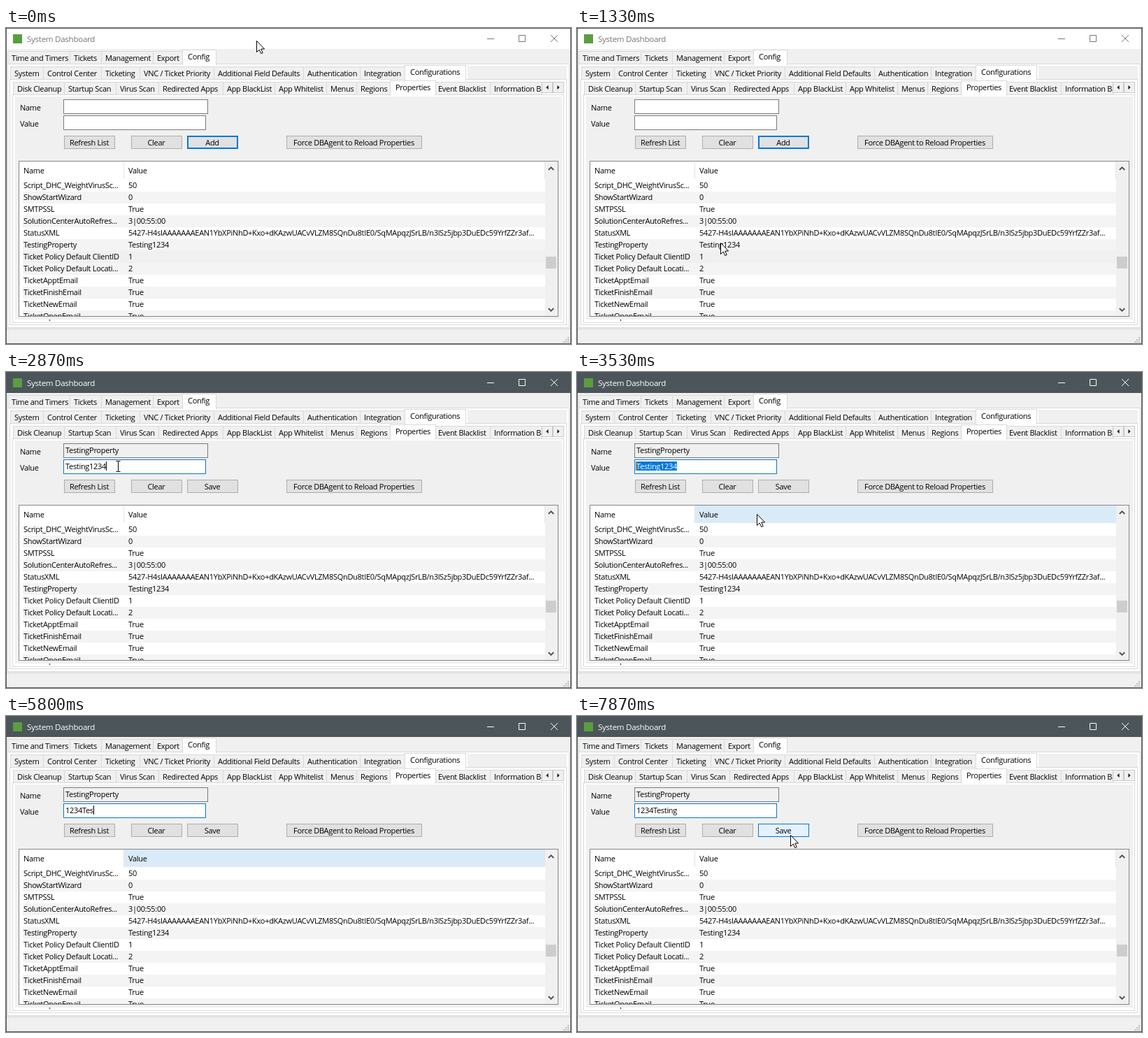
These frames come from a looping animation (808x452 px, 8 s). An HTML page:

```html
<!DOCTYPE html>
<html lang="en">
<head>
<meta charset="utf-8">
<title>System Dashboard</title>
<style>
  html, body { margin: 0; width: 100%; height: 100%; overflow: hidden; background: #f0f0f0; }
  svg { display: block; width: 808px; height: 452px; }
  rect { shape-rendering: crispEdges; }
  text { font: 11px 'Open Sans', 'Noto Sans', sans-serif; letter-spacing: -.3px; fill: #000; white-space: pre; }
  .title { font-size: 11.6px; }
  .mid { text-anchor: middle; }
</style>
</head>
<body>
<svg id="stage" viewBox="0 0 808 452"></svg>
<script>
const LOOP = 8000, STEP = 200 / 3;
const BLUE = '#0078d7', FACE = '#f0f0f0', LINE = '#d9d9d9';
const stage = document.getElementById('stage');

function add(tag, attrs, content) {
  const node = document.createElementNS('http://www.w3.org/2000/svg', tag);
  set(node, attrs);
  if (content !== undefined) node.textContent = content;
  return stage.appendChild(node);
}
function set(node, attrs) {
  for (const key in attrs) node.setAttribute(key, attrs[key]);
}
const fill = (x, y, width, height, color) => add('rect', { x, y, width, height, fill: color });
const box = (x, y, w, h, color, stroke) =>
  add('rect', { x: x + .5, y: y + .5, width: w - 1, height: h - 1, fill: color, stroke });
const label = (x, y, content, cls = '') => add('text', { x, y, class: cls }, content);
const path = (d, stroke, color = 'none') => add('path', { d, stroke, fill: color });
const show = (node, on) => node.setAttribute('visibility', on ? 'visible' : 'hidden');

// Window frame
fill(0, 0, 808, 452, FACE);
const titleBar = fill(1, 1, 806, 29, '#fff');
fill(10, 9, 13, 13, '#5a9e3f');
const title = label(30, 20, 'System Dashboard', 'title');
const captionIcons = path('M688 15.5h10M733.5 10.5h9v9h-9zM779 10l10 10M789 10l-10 10', '#777');

// Nested tab controls
function tabs(top, items, selected, end) {
  const edge = i => i < items.length ? items[i][1] - 6 : end;
  items.forEach(([name, x], i) => {
    if (i !== selected) box(edge(i), top, edge(i + 1) - edge(i) + 1, 19, FACE, LINE);
  });
  const left = edge(selected) - 2, width = edge(selected + 1) - left + 3;
  box(left, top - 2, width, 22, '#fff', LINE);
  fill(left + 1, top + 18, width - 2, 3, '#fff');
  items.forEach(([name, x], i) => label(x, top + (i === selected ? 12 : 14), name));
}
box(2, 51, 804, 378, '#fff', LINE);
fill(660, 54, 142, 19, FACE);
tabs(33, [['Time and Timers', 8], ['Tickets', 97], ['Management', 142], ['Export', 216], ['Config', 260]], 4, 298);
box(5, 73, 797, 352, '#fff', LINE);
tabs(55, [['System', 12], ['Control Center', 59], ['Ticketing', 142], ['VNC / Ticket Priority', 197],
  ['Additional Field Defaults', 303], ['Authentication', 431], ['Integration', 512], ['Configurations', 578]], 7, 655);
box(9, 95, 789, 327, '#fff', LINE);
fill(13, 98, 782, 319, FACE);
tabs(77, [['Disk Cleanup', 16], ['Startup Scan', 89], ['Virus Scan', 163], ['Redirected Apps', 224],
  ['App BlackList', 316], ['App Whitelist', 390], ['Menus', 464], ['Regions', 507], ['Properties', 557],
  ['Event Blacklist', 618], ['Information Ba', 698]], 8, 766);
box(766, 77, 16, 16, FACE, '#c8c8c8');
box(782, 77, 16, 16, FACE, '#c8c8c8');
path('M775.5 82v6l-3-3zM788.5 82v6l3-3z', 'none', '#000');

// Form
label(20, 118, 'Name');
label(20, 141, 'Value');
const nameField = box(82, 102, 207, 21, '#fff', '#7a7a7a');
const valueField = box(82, 125, 204, 21, '#fff', '#7a7a7a');
const nameText = label(85, 116, '');
const selection = fill(84, 128, 61, 13, BLUE);
const valueText = label(85, 139, '');
const caret = fill(85, 128, 1, 13, '#000');

function button(x, w, name) {
  const face = box(x, 154, w, 19, '#e1e1e1', '#adadad');
  const ring = add('rect', { x: x + 1, y: 155, width: w - 2, height: 17, fill: 'none',
    stroke: BLUE, 'stroke-width': 2, visibility: 'hidden' });
  return { x, w, face, ring, text: label(x + w / 2 - .5, 168, name, 'mid') };
}
const buttons = [button(83, 73, 'Refresh List'), button(179, 73, 'Clear'),
  button(259, 73, 'Add'), button(401, 194, 'Force DBAgent to Reload Properties')];
const saveButton = buttons[2];

// Property list
const ROWS = [
  ['Script_DHC_WeightVirusSc...', '50'],
  ['ShowStartWizard', '0'],
  ['SMTPSSL', 'True'],
  ['SolutionCenterAutoRefres...', '3|00:55:00'],
  ['StatusXML', '5427-H4sIAAAAAAAEAN1YbXPiNhD+Kxo+dKAzwUACvVLZM8SQnDu8tIE0/SqMApqzJSrLB/n3lSz5jbp3DuEDc59YrfZZr3af...'],
  ['TestingProperty', 'Testing1234'],
  ['Ticket Policy Default ClientID', '1'],
  ['Ticket Policy Default Locati...', '2'],
  ['TicketApptEmail', 'True'],
  ['TicketFinishEmail', 'True'],
  ['TicketNewEmail', 'True'],
  ['TicketOpenEmail', 'True']
];
const PICKED = 5, PICKED_BEFORE = 6;
fill(18, 190, 772, 223, '#fff');
const header = fill(169, 191, 602, 25, '#d9ebf9');
fill(168, 191, 1, 25, '#e5e5e5');
fill(770, 191, 1, 25, '#e5e5e5');
label(25, 208, 'Name');
label(175, 208, 'Value');
const rows = ROWS.map(([name, value], i) => {
  const y = 217 + 17 * i;
  return {
    back: fill(24, y, 747, Math.min(17, 412 - y), i % 2 ? '#f4f4f4' : '#fff'),
    texts: [label(25, y + 12, name), label(175, y + 12, value)]
  };
});
fill(771, 191, 18, 221, FACE);
fill(772, 327, 15, 17, '#cdcdcd');
set(path('M775.8 203l3.7-3.7l3.7 3.7M775.8 401l3.7 3.7l3.7-3.7', '#505050'), { 'stroke-width': 1.8 });
fill(19, 412, 770, 5, FACE);
box(18, 190, 772, 223, 'none', '#828790');

// Status bar and window edge
fill(1, 430, 806, 1, '#d7d7d7');
for (let r = 0; r < 3; r++)
  for (let c = 2 - r; c < 3; c++) fill(797 + c * 3, 442 + r * 3, 2, 2, '#bfbfbf');
const edge = box(0, 0, 808, 452, 'none', '#555');

// Pointers
const arrow = path('M.5 .5V16.5L4.2 13L6.7 18.5L9.2 17.5L6.8 12H11.6Z', '#000', '#fff');
const beam = path('M-3 -7.5h2.5l.5 .5l.5 -.5h2.5M0 -7v14M-3 7.5h2.5l.5 -.5l.5 .5h2.5', '#000');

const POINTER = [
  [133, 358, 18], [333, 345, 48], [600, 290, 150], [800, 247, 228], [1000, 219, 283], [1333, 205, 307],
  [1900, 205, 307], [2200, 187, 199], [2533, 192, 154], [2600, 180, 135], [2733, 160, 135],
  [2867, 160, 135], [3133, 76, 135], [3267, 110, 160], [3467, 252, 200], [3533, 257, 203],
  [6933, 318, 197], [7000, 320, 197], [7200, 330, 193], [7533, 309, 172], [7667, 305, 170]
];
const TYPED = [[4670, 1], [4730, 2], [4870, 3], [5070, 4], [5470, 5], [5530, 6],
  [5800, 7], [5930, 8], [6070, 9], [6200, 10], [6270, 11]];
const CLICK = 1730, LOADED = 1870, PRESS = 2870, RELEASE = 3140, TYPE = 4670, MOVE_AGAIN = 7000;
const REST = 3530, BLINK = 530;

function pointerAt(t) {
  const i = POINTER.findIndex(p => p[0] > t);
  if (i === 0) return POINTER[0].slice(1);
  if (i < 0) return POINTER[POINTER.length - 1].slice(1);
  const [t0, x0, y0] = POINTER[i - 1], [t1, x1, y1] = POINTER[i];
  if (t0 > REST && t < MOVE_AGAIN - STEP || t0 >= REST && t < TYPE) return [x0, y0];
  const k = (t - t0) / (t1 - t0);
  return [Math.round(x0 + (x1 - x0) * k), Math.round(y0 + (y1 - y0) * k)];
}

function draw(ms) {
  const time = Math.floor((ms + 5) / STEP) * STEP, t = time + 5;
  const active = t >= CLICK, loaded = t >= LOADED, focused = t >= PRESS;
  const dragging = focused && t < RELEASE, typing = t >= TYPE;
  const [px, py] = pointerAt(time);
  const over = (x, y, w, h) => px >= x && px < x + w && py >= y && py < y + h;

  set(titleBar, { fill: active ? '#4b555a' : '#fff' });
  set(edge, { stroke: active ? '#4b555a' : '#555' });
  title.style.fill = active ? '#fff' : '#777';
  set(captionIcons, { stroke: active ? '#fff' : '#777' });

  const picked = active && !focused;
  set(rows[PICKED].back, { fill: picked ? BLUE : '#f4f4f4' });
  rows[PICKED].texts.forEach(node => { node.style.fill = picked ? '#fff' : '#000'; });
  set(rows[PICKED_BEFORE].back, { fill: active ? '#fff' : FACE });

  set(nameField, { fill: loaded ? FACE : '#fff' });
  nameText.textContent = loaded ? 'TestingProperty' : '';
  const overValue = over(82, 125, 204, 21);
  set(valueField, { stroke: focused ? BLUE : overValue ? '#171717' : '#7a7a7a' });

  const lastKey = TYPED.filter(k => k[0] <= t).pop();
  valueText.textContent = lastKey ? '1234Testing'.slice(0, lastKey[1]) : loaded ? 'Testing1234' : '';
  const length = valueText.getComputedTextLength();
  const from = dragging ? Math.max(84, Math.min(px, 85 + length)) : 84;
  const selected = focused && !typing && from < 85 + length;
  show(selection, selected);
  set(selection, { x: from, width: 85 + length - from });
  valueText.style.fill = selected && from < 100 ? '#fff' : '#000';

  const caretOn = Math.floor((t - (lastKey ? lastKey[0] : 3470)) / BLINK) % 2 === 0;
  show(caret, focused && (dragging || caretOn));
  set(caret, { x: Math.round(typing ? 85 + length : Math.max(85, from)),
    fill: selected ? '#ff8728' : '#000' });

  const pointerShown = !typing || t >= MOVE_AGAIN;
  const ibeam = dragging || overValue;
  saveButton.text.textContent = loaded ? 'Save' : 'Add';
  for (const b of buttons) {
    const hover = !dragging && pointerShown && over(b.x, 154, b.w, 19);
    set(b.face, { fill: hover ? '#e5f1fb' : '#e1e1e1', stroke: hover ? BLUE : '#adadad' });
    show(b.ring, b === saveButton && !loaded);
  }
  // The header stays lit while the pointer is hidden over it
  show(header, typing && !pointerShown || over(169, 191, 602, 25));

  show(arrow, pointerShown && !ibeam);
  show(beam, pointerShown && ibeam);
  set(arrow, { transform: `translate(${px} ${py})` });
  set(beam, { transform: `translate(${px + .5} ${py})` });
}

const start = performance.now();
function tick() {
  draw((performance.now() - start) % LOOP);
  requestAnimationFrame(tick);
}
tick();
</script>
</body>
</html>
```
